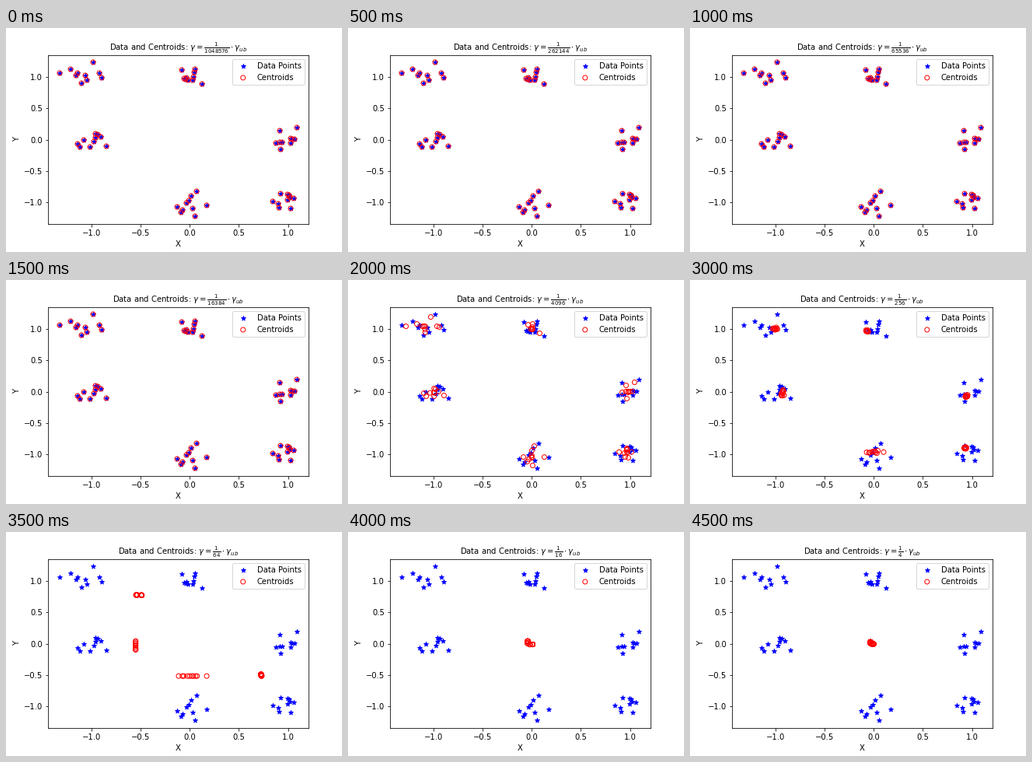
Animation of 432x288 px, one loop 5 s. Source, as a matplotlib script:

```python
import numpy as np
import matplotlib.pyplot as plt
from matplotlib.animation import FuncAnimation

WIDTH, HEIGHT, DPI = 432, 288, 72
LEFT, RIGHT, TOP, BOTTOM = 54.0, 388.8, 34.56, 252.0
ORIGIN = np.array([236.2, 143.7])   # stage position of (0, 0)
UNIT = np.array([126.4, -80.6])     # pixels per data unit
STEPS = 10

# Observations, one cluster per line pair, as stage positions.
observed = np.array([
    [(69, 58), (83, 53), (92, 58), (90, 61), (97, 71),
     (102, 61), (104, 67), (112, 44), (120, 58), (123, 64)],
    [(226, 54), (229, 65), (231, 66), (232, 64), (234, 67),
     (240, 67), (241, 63), (242, 57), (243, 53), (252, 72)],
    [(92, 149), (95, 153), (100, 144), (108, 153), (113, 146),
     (115, 141), (115, 136), (118, 137), (122, 140), (129, 152)],
    [(347, 148), (352, 132), (352, 147), (353, 156), (355, 147),
     (366, 142), (366, 148), (368, 143), (371, 143), (374, 128)],
    [(220, 230), (225, 237), (227, 234), (232, 225), (235, 222),
     (238, 216), (240, 232), (243, 242), (245, 210), (258, 228)],
    [(343, 223), (350, 226), (351, 231), (353, 213), (362, 214),
     (362, 221), (364, 215), (365, 218), (366, 232), (370, 219)],
])
cloud = (observed - ORIGIN) / UNIT
mid = cloud.mean(axis=1, keepdims=True)

# Where each cluster heads, and how much of its x and y spread survives.
meet = np.array([(-0.54, 0.778), (-0.49, 0.775), (-0.55, -0.03),
                 (0.725, -0.49), (0.01, -0.515), (0.73, -0.51)])[:, None]
keep = np.full((6, 1, 2), 0.03)
keep[2] = 0, 0.65
keep[4] = 0.95, 0
hub = np.array([-0.02, 0.01])


def mix(a, b, t):
    return a + (b - a) * t


def gather(centre, spread):
    """Scale every cluster by spread around a new centre."""
    return centre + spread * (cloud - mid)


def nudge(step):
    """Move each coordinate by at most step towards its cluster's middle."""
    return cloud - np.clip(cloud - mid, -step, step)


path = [cloud] * 4 + [
    nudge(0.044),
    gather(mid, 0.2),
    gather(mix(mid, meet, 0.15), mix(0.2, keep, 0.5)),
    gather(meet, keep),
    gather(hub + 0.04 * meet, 0),
    gather(hub + 0.025 * meet, 0),
]

plt.rcParams.update({"font.family": "DejaVu Sans", "font.size": 10})
fig, ax = plt.subplots(figsize=(WIDTH / DPI, HEIGHT / DPI), dpi=DPI)
fig.subplots_adjust(left=LEFT / WIDTH, right=RIGHT / WIDTH,
                    bottom=1 - BOTTOM / HEIGHT, top=1 - TOP / HEIGHT)

xs, ys = cloud.reshape(-1, 2).T
ax.scatter(xs, ys, marker="*", color="blue", label="Data Points")
circles = ax.scatter(xs, ys, marker="o", facecolors="none",
                     edgecolors="red", label="Centroids")

corners = (np.array([(LEFT, BOTTOM), (RIGHT, TOP)]) - ORIGIN) / UNIT
ax.set_xlim(corners[:, 0])
ax.set_ylim(corners[:, 1])
ticks = np.linspace(-1, 1, 5)
ax.set_xticks(ticks)
ax.set_yticks(ticks)
ax.set_xlabel("X")
ax.set_ylabel("Y")
ax.legend(loc="upper right")
title = ax.set_title("", fontsize=10)


def update(i):
    circles.set_offsets(path[i].reshape(-1, 2))
    title.set_text(r"Data and Centroids: $\gamma = \frac{1}{%d} \cdot "
                   r"\gamma_{ub}$" % 4 ** (STEPS - i))
    return circles, title


anim = FuncAnimation(fig, update, frames=STEPS, interval=500, repeat=True,
                     repeat_delay=0, init_func=lambda: update(0))
plt.show()
```
